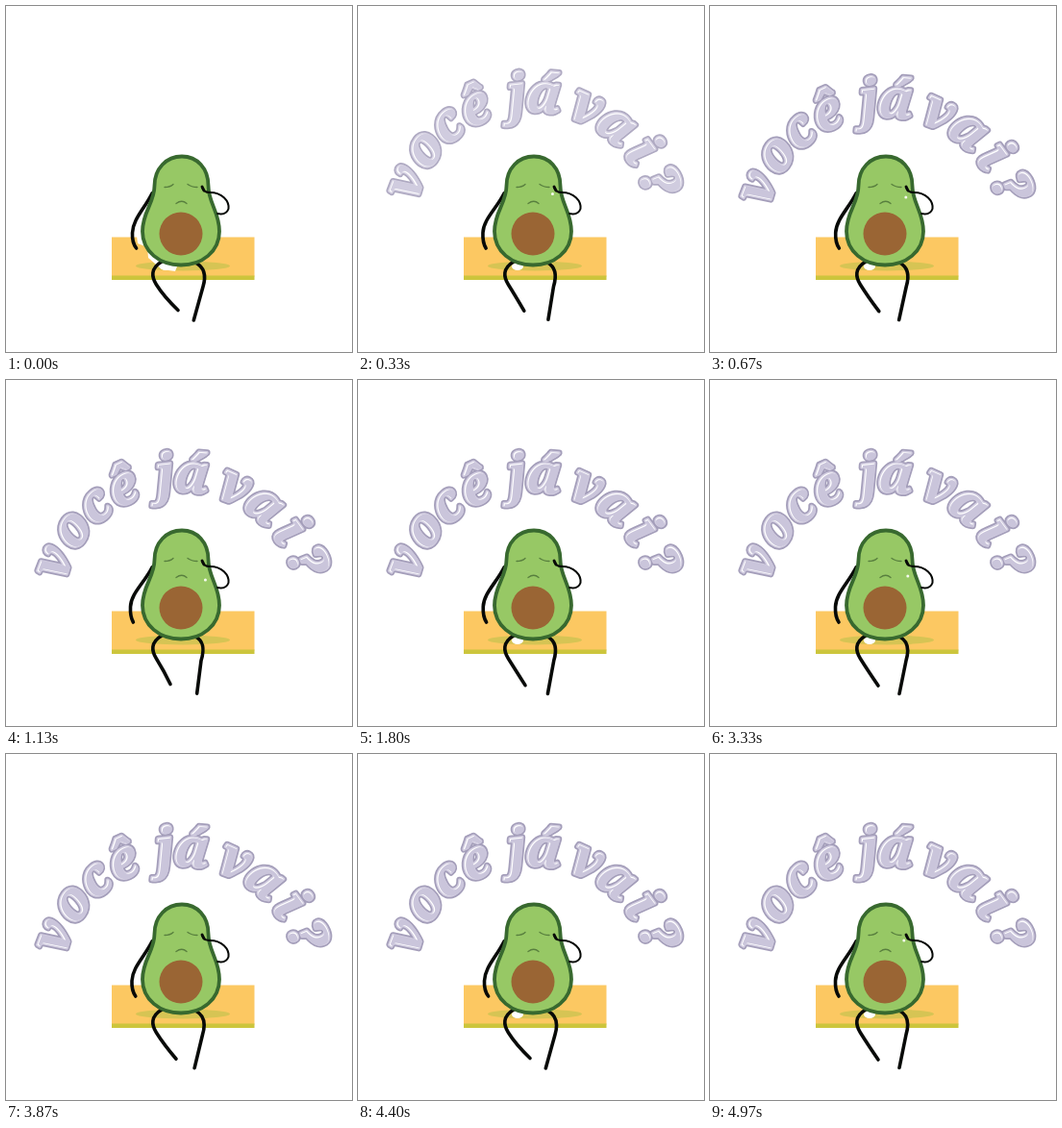
An HTML page that plays this animation: 360x360 px, repeating every 5 s.

```html
<!DOCTYPE html>
<html lang="pt">
<head>
<meta charset="utf-8">
<style>
html, body { margin: 0; width: 100%; height: 100%; overflow: hidden; background: #fff; }
svg { display: block; width: 100vw; height: 100vh; }
text { font: italic 900 55px "Noto Serif", "Liberation Serif", serif; text-anchor: middle; stroke-linejoin: round; }
.rim { fill: #a49eba; stroke: #a49eba; stroke-width: 6.5; }
.edge { fill: #d3cee1; stroke: #d3cee1; stroke-width: 3; }
.shine { fill: #fff; }
.core { fill: #cac5db; }
.limb { fill: none; stroke: #080a08; stroke-width: 3.6; stroke-linecap: round; stroke-linejoin: round; }
.face { fill: none; stroke: #587f3e; stroke-width: 1.3; stroke-linecap: round; }
</style>
</head>
<body>
<svg viewBox="0 0 360 360">
  <rect x="110" y="240.5" width="148.5" height="41" fill="#fcc862"/>
  <rect x="110" y="280.5" width="148.5" height="4.5" fill="#ccc53c"/>
  <ellipse cx="184" cy="270.5" rx="49" ry="5" fill="#d6c454"/>
  <path id="gap" d="M136 239L145 239L149 250L158 250L178 271L176 276L162 274L148 262L147 251L137 247Z" fill="#fff"/>
  <ellipse id="spot" cx="166" cy="271" rx="6" ry="4" fill="#fff"/>
  <path id="legL" class="limb"/>
  <path id="legR" class="limb"/>
  <path id="armL" class="limb"/>
  <path d="M183 156.5C199 156.5 210.5 169 210.5 187C210.5 205 222 214 222 234.5C222 255.5 204 269.5 182 269.5C160 269.5 142 255.5 142 234.5C142 214 154.5 205 154.5 187C154.5 169 167 156.5 183 156.5Z"
    fill="#97c865" stroke="#38692f" stroke-width="3.8"/>
  <circle cx="182" cy="237" r="22.5" fill="#9a6534"/>
  <path class="face" d="M165 188.5Q171 188.5 174 185.5M189 185.5Q193 188.5 199 188.5M177 205.5Q183 201 188 205.5"/>
  <path class="limb" style="stroke-width:2" d="M204 188Q205 194 212 194C225 194 232.5 203 231.5 211Q229 218 220 216"/>
  <path class="limb" style="stroke-width:2.8" d="M204 188L206 192"/>
  <circle id="tear" r="1.5" fill="#f6fbef"/>
  <g id="title"></g>
</svg>
<script>
const LOOP = 5000, CYCLE = 2400;
const $ = id => document.getElementById(id);

// Letters and their angles along the arc, in degrees
const letters = [["v", -69], ["o", -53], ["c", -39], ["ê", -25], ["j", -6.5],
  ["á", 5], ["v", 24], ["a", 39], ["i", 54], ["?", 68.5]];
const layer = (cls, ch, d = 0) => `<text class="${cls}" x="${d}" y="${-124 + d}">${ch}</text>`;
$("title").innerHTML = letters.map(([ch, angle]) =>
  `<g transform="translate(181 240) rotate(${angle})">` +
  layer("rim", ch) + layer("edge", ch) + layer("shine", ch) + layer("core", ch, 0.9) +
  "</g>").join("");

const swingKeys = [[0, 1], [170, 0], [400, -0.7], [670, 0.2], [930, 0], [1130, -1],
  [1400, 0.7], [1700, -0.7], [2000, 1], [2400, 1]];
const tearKeys = [[0, 192], [170, 194], [670, 199], [930, 204], [1130, 208], [1250, 211]];

const linear = u => u;
const smooth = u => u * u * (3 - 2 * u);
function sample(keys, t, ease) {
  const i = keys.findIndex(k => k[0] > t);
  if (i < 0) return keys[keys.length - 1][1];
  const [t0, a] = keys[i - 1], [t1, b] = keys[i];
  return a + (b - a) * ease((t - t0) / (t1 - t0));
}
const show = (id, on) => $(id).setAttribute("visibility", on ? "visible" : "hidden");

function draw() {
  const t = performance.now() % LOOP, p = t % CYCLE;
  const s = sample(swingKeys, p, smooth);

  $("legL").setAttribute("d", `M162 266C150 273 151.5 282 156.5 290Q164 302 ${175 + 4 * s} ${318 - 1.5 * Math.abs(s)}`);
  $("legR").setAttribute("d", `M197 267C207 272 ${207 + s} 282 ${204 + s} 292L${197 - 1.7 * s} ${326.5 + 0.4 * s}`);
  $("armL").setAttribute("d", `M152 195C144 211 ${131 + s} 222 ${130.5 + s} 236Q${130 + s} 246 ${134 + 1.6 * s} 252`);

  const y = sample(tearKeys, p, linear);
  $("tear").setAttribute("cx", 201 + (y - 192) * 0.4);
  $("tear").setAttribute("cy", y);
  show("tear", p > 60 && p < 1250);
  show("gap", p < 100);
  show("spot", p < 1000 || p > 1500);

  // The title drops in and settles
  const k = Math.max(0, t - 70);
  $("title").setAttribute("transform", `translate(0 ${-30 * Math.exp(-k / 170)})`);
  $("title").setAttribute("opacity", Math.min(1, k / 300));
  requestAnimationFrame(draw);
}
draw();
</script>
</body>
</html>
```
